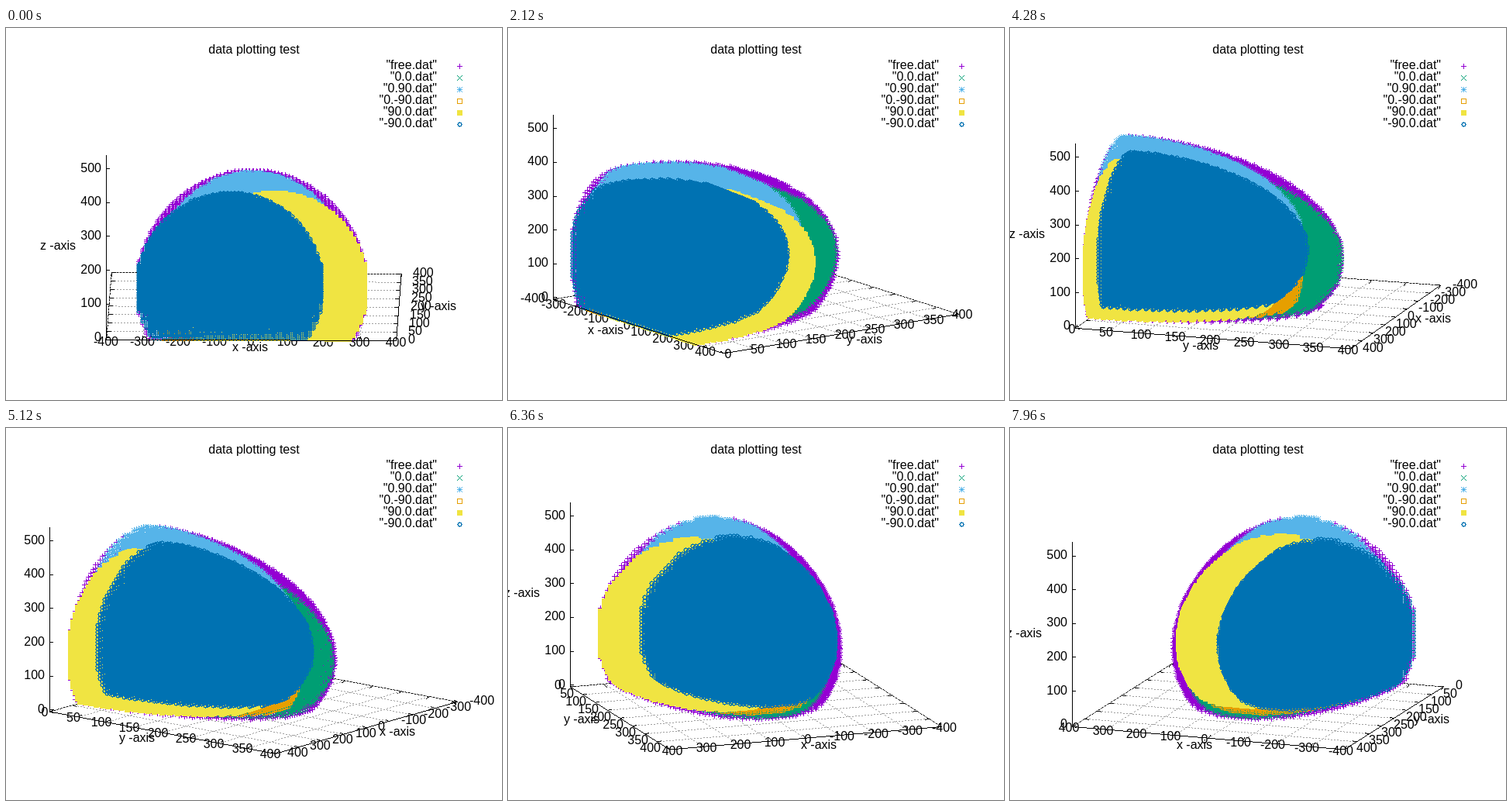
Write an HTML page with a canvas that moves like this. It is 640 by 480 pixels and loops after 8 s.

```html
<!DOCTYPE html>
<html lang="en">
<head>
<meta charset="utf-8">
<title>Rotating 3D scatter plot</title>
<style>
html, body { margin: 0; width: 100%; height: 100%; overflow: hidden; background: #fff; }
canvas { display: block; }
</style>
</head>
<body>
<canvas id="stage" width="640" height="480"></canvas>
<script>
const W = 640, H = 480;
const ctx = document.getElementById('stage').getContext('2d');
const layer = document.createElement('canvas');
layer.width = W;
layer.height = H;
const layerCtx = layer.getContext('2d');
const image = layerCtx.createImageData(W, H);
const pixels = new Uint32Array(image.data.buffer);

const FRAME_MS = 40, FRAMES = 200;
const CX = 319.4, CY = 359.2;         // centre of the base plane on screen
const HALF = 187, TILT = 0.2305;      // half side of the base, vertical squash
const Z_UNIT = 0.4365, Z_MIN = -5, Z_MAX = 540;
const STEP = 10, SHOULDER = 142, REACH = 260, HAND = 60;

const rgb = (r, g, b) => (255 << 24 | b << 16 | g << 8 | r) >>> 0;
const BLACK = rgb(0, 0, 0), GREY = rgb(160, 160, 160);

// Marker shapes as tests on a 7 x 7 pixel cell.
const extent = (x, y) => Math.max(Math.abs(x), Math.abs(y));
const plus = (x, y) => !x || !y;
const cross = (x, y) => Math.abs(x) === Math.abs(y);
const shapes = {
  plus,
  cross,
  star: (x, y) => plus(x, y) || cross(x, y),
  box: (x, y) => extent(x, y) === 3,
  block: () => true,
  ring: (x, y) => extent(x, y) === 2 || extent(x, y) === 3 && plus(x, y)
};

function markerOffsets(test) {
  const list = [];
  for (let y = -3; y <= 3; y++)
    for (let x = -3; x <= 3; x++)
      if (test(x, y)) list.push(y * W + x);
  return Int32Array.from(list);
}

const cloud = (name, color, shape, dx, dy, dz, radius) => ({
  name, color, offsets: markerOffsets(shapes[shape]),
  x: dx, y: dy, z: SHOULDER + dz, radius
});
const clouds = [
  cloud('free.dat', rgb(148, 0, 211), 'plus', 0, 0, 0, REACH + HAND),
  cloud('0.0.dat', rgb(0, 158, 115), 'cross', 0, HAND, 0, REACH),
  cloud('0.90.dat', rgb(86, 180, 233), 'star', 0, 0, HAND, REACH),
  cloud('0.-90.dat', rgb(230, 159, 0), 'box', 0, 0, -HAND, REACH),
  cloud('90.0.dat', rgb(240, 228, 66), 'block', HAND, 0, 0, REACH),
  cloud('-90.0.dat', rgb(0, 114, 178), 'ring', -HAND, 0, 0, REACH)
];

let sin = 0, cos = 1;

function project(x, y, z = Z_MIN) {
  const nx = x / 400, ny = (y - 200) / 200;
  return [
    CX + HALF * (nx * cos + ny * sin),
    CY + HALF * TILT * (nx * sin - ny * cos) - (z - Z_MIN) * Z_UNIT
  ];
}

function line([x0, y0], [x1, y1], color = BLACK, dashed = false) {
  const n = Math.max(1, Math.round(Math.max(Math.abs(x1 - x0), Math.abs(y1 - y0))));
  for (let i = 0; i <= n; i++) {
    if (dashed && i % 4 > 1) continue;
    const x = Math.round(x0 + (x1 - x0) * i / n);
    const y = Math.round(y0 + (y1 - y0) * i / n);
    pixels[y * W + x] = color;
  }
}

// y is the middle of the capital letters.
function text(str, x, y, align = 'center') {
  ctx.textAlign = align;
  ctx.fillText(str, Math.round(x), Math.round(y + 5.5));
}

function stamp(at, offsets, color) {
  for (let i = 0; i < offsets.length; i++) pixels[at + offsets[i]] = color;
}

function drawCloud({ x: cx, y: cy, z: cz, radius, color, offsets }) {
  const r2 = radius * radius;
  for (let x = -400; x <= 400; x += STEP) {
    for (let y = 0; y <= 400; y += STEP) {
      const h2 = r2 - (x - cx) ** 2 - (y - cy) ** 2;
      if (h2 < 0) continue;
      const h = Math.sqrt(h2);
      const [sx, sy] = project(x, y, 0);
      const col = Math.round(sx);
      for (let z = Math.max(0, Math.ceil((cz - h) / STEP) * STEP); z <= cz + h; z += STEP)
        stamp(Math.round(sy - z * Z_UNIT) * W + col, offsets, color);
    }
  }
}

// at(value, side): base point of a tick, side 1 is the labelled front edge.
function drawBaseAxis({ title, min, step, at, dx, dy }) {
  const n = Math.hypot(dx, dy / 2), ux = dx / n, uy = dy / 2 / n;
  for (let v = min; v <= 400; v += step) line(at(v, 1), at(v, -1), GREY, true);
  for (let v = min; v <= 400; v += step) {
    const near = at(v, 1), far = at(v, -1), [x, y] = near;
    line(near, [x - 5 * ux, y - 5 * uy]);
    line(far, [far[0] + 5 * ux, far[1] + 5 * uy]);
    if (ux > 0.9) text(v, x + 15.5, y - 1.5, 'left');
    else if (ux < -0.9) text(v, x - 10.5, y - 1.5, 'right');
    else text(v, x + 7 * ux, y - 1 + 3.5 * uy);
  }
  const [mx, my] = at((min + 400) / 2, 1);
  text(title, mx + 51.5 * dx, my + 11.5 * dy - 2);
}

const edge = ({ min, at }, side) => line(at(min, side), at(400, side));

function drawZAxis([x, y]) {
  const tickY = z => y - (z - Z_MIN) * Z_UNIT;
  line([x, y], [x, tickY(Z_MAX)]);
  for (let z = 0; z <= 500; z += 100) {
    line([x, tickY(z)], [x + 4, tickY(z)]);
    text(z, x - 6, tickY(z) - 1, 'right');
  }
  if (x >= 62) text('z -axis', x - 62, (y + tickY(Z_MAX)) / 2 - 2);
}

function draw(frame) {
  const angle = (frame + 1) * Math.PI / 180;
  sin = Math.sin(angle);
  cos = Math.cos(angle);
  pixels.fill(0);
  ctx.fillStyle = '#fff';
  ctx.fillRect(0, 0, W, H);
  ctx.fillStyle = '#000';
  ctx.font = '16px "Liberation Sans", Arial, sans-serif';

  const sx = sin < 0 ? -1 : 1, sy = cos < 0 ? 1 : -1;
  const axes = [
    { title: 'x -axis', min: -400, step: 100, dx: sy * sin, dy: Math.abs(cos),
      at: (v, side) => project(v, 200 + 200 * sy * side) },
    { title: 'y -axis', min: 0, step: 50, dx: sx * cos, dy: Math.abs(sin),
      at: (v, side) => project(400 * sx * side, v) }
  ];

  text('data plotting test', 320, 27.5);
  axes.forEach(axis => edge(axis, -1));
  axes.forEach(drawBaseAxis);
  drawZAxis(project(400 * sy, 200 - 200 * sx));
  clouds.forEach((c, i) => {
    const y = 49 + 15 * i;
    text(`"${c.name}"`, 556, y - 1.5, 'right');
    stamp(y * W + 585, c.offsets, c.color);
    drawCloud(c);
  });
  axes.forEach(axis => edge(axis, 1));
  layerCtx.putImageData(image, 0, 0);
  ctx.drawImage(layer, 0, 0);
}

let shown = -1;
function tick() {
  const frame = Math.floor(performance.now() / FRAME_MS) % FRAMES;
  if (frame !== shown) draw(shown = frame);
  requestAnimationFrame(tick);
}
tick();
</script>
</body>
</html>
```
